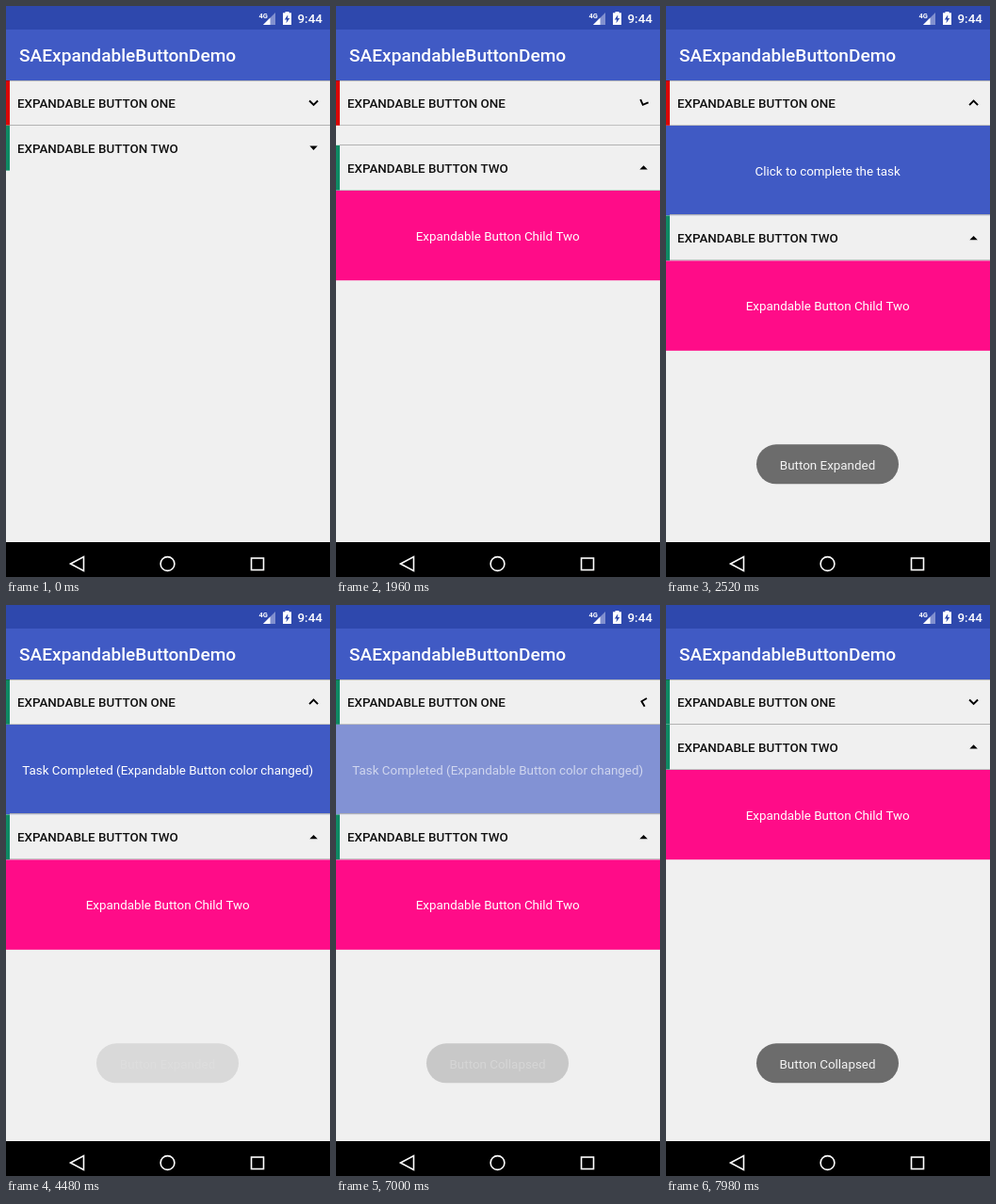
An HTML page with a canvas that plays this animation: 344 px wide and 606 px high, repeating every 8 s.

```html
<!DOCTYPE html>
<html lang="en">
<head>
<meta charset="utf-8">
<title>Expandable buttons</title>
<style>
  html, body { margin: 0; width: 100%; height: 100%; overflow: hidden; background: #f0f0f0; }
  canvas { display: block; width: 344px; height: 606px; }
</style>
</head>
<body>
<canvas id="stage"></canvas>
<script>
const W = 344, H = 606, LOOP = 8000, STEP = 70;
const ROW = 47.8, CHILD = 95.6, TOP = 79;
const BG = '#f0f0f0', BLUE = '#405ac4', PINK = '#ff0c88', RED = '#dc0505', GREEN = '#0f8a64';
const FONT = 'Roboto, "Open Sans", sans-serif';

// Moments of the user's taps, in ms
const OPEN_TWO = 400, OPEN_ONE = 1925, TASK_DONE = 4200, CLOSE_ONE = 6874;
const TOAST_DELAY = 44, TOAST_HOLD = 2056;

const canvas = document.getElementById('stage');
const ctx = canvas.getContext('2d');
const dpr = window.devicePixelRatio || 1;
canvas.width = W * dpr;
canvas.height = H * dpr;

const ramp = (t, start, length) => Math.min(1, Math.max(0, (t - start) / length));
const easeOut = p => 1 - (1 - p) * (1 - p);
const easeInOut = p => (1 - Math.cos(Math.PI * p)) / 2;

// Opening: make room, then fade in. Closing: fade out, then give the room back.
function panel(t, open, close) {
  return {
    room: easeOut(ramp(t, open, 300)) - easeOut(ramp(t, close + 300, 300)),
    alpha: easeInOut(ramp(t, open + 300, 300)) - easeInOut(ramp(t, close, 300)),
    turn: ramp(t, open, 300) - ramp(t, close, 300)
  };
}

function toastAlpha(t, tap) {
  const start = tap + TOAST_DELAY;
  const out = ramp(t, start + TOAST_HOLD, 500);
  return easeOut(ramp(t, start, 500)) * (1 - out * out);
}

function rect(x, y, w, h, color) {
  ctx.fillStyle = color;
  ctx.fillRect(x, y, w, h);
}

function text(str, x, y, size, color, weight = 400, align = 'left') {
  ctx.font = `${weight} ${size}px ${FONT}`;
  ctx.fillStyle = color;
  ctx.textAlign = align;
  ctx.fillText(str, x, y);
}

function path(points, closed) {
  ctx.beginPath();
  points.forEach(([x, y]) => ctx.lineTo(x, y));
  if (closed) ctx.closePath();
}

function fillPath(points, color) {
  path(points, true);
  ctx.fillStyle = color;
  ctx.fill();
}

function strokePath(points, color, width, closed) {
  path(points, closed);
  ctx.strokeStyle = color;
  ctx.lineWidth = width;
  ctx.stroke();
}

function statusBar() {
  rect(0, 0, W, 25, '#2e48ad');
  fillPath([[286, 7], [286, 20], [273, 20]], '#8190cf');
  fillPath([[280.5, 12.5], [280.5, 20], [273, 20]], '#fff');
  rect(268, 6, 11, 8, '#2e48ad');
  text('4G', 268.5, 13, 7.5, '#fff', 700);
  rect(296.5, 6, 4, 2, '#fff');
  rect(294, 7.3, 9, 12.7, '#fff');
  fillPath([[299.3, 9.3], [295.8, 14.5], [298, 14.5], [297.5, 18.2],
            [301.2, 13], [299, 13]], '#2e48ad');
  text('9:44', 309.5, 18, 13.4, '#fff', 500);
}

function appBar() {
  rect(0, 25, W, TOP - 25, BLUE);
  text('SAExpandableButtonDemo', 14, 59, 19.1, '#fff', 500);
}

function navBar() {
  rect(0, 569, W, H - 569, '#000');
  strokePath([[68.5, 592], [82.5, 584.5], [82.5, 599.5]], '#fff', 1.6, true);
  ctx.beginPath();
  ctx.arc(171.5, 592, 7.4, 0, Math.PI * 2);
  ctx.stroke();
  ctx.strokeRect(260.5, 586, 13, 12.5);
}

function arrow(y, turn, solid) {
  ctx.save();
  ctx.translate(326.6, y);
  ctx.rotate(turn * Math.PI);
  if (solid) fillPath([[-4.2, -2], [4.2, -2], [0, 2.3]], '#000');
  else strokePath([[-4.5, -2.3], [0, 2.2], [4.5, -2.3]], '#000', 1.9);
  ctx.restore();
}

function row(y, label, color, state, solid) {
  rect(0, y, W, ROW, BG);
  rect(4, Math.round(y) - 1, W - 4, 1, '#b2b2b2');
  if (state.room > 0) rect(4, Math.round(y + ROW) - 1, W - 4, 1, '#c0c0c0');
  rect(0, y, 4, ROW, color);
  text(label, 12, Math.round(y + 29), 13.4, '#111', 500);
  arrow(y + 23.8, state.turn, solid);
}

function child(y, label, color, alpha) {
  if (alpha <= 0) return;
  ctx.globalAlpha = alpha;
  rect(0, y, W, CHILD, color);
  text(label, 171.7, Math.round(y + 53), 13.4, '#fff', 400, 'center');
  ctx.globalAlpha = 1;
}

function toast(label, alpha) {
  if (alpha <= 0) return;
  ctx.save();
  ctx.globalAlpha = alpha;
  ctx.beginPath();
  ctx.roundRect(96, 465.3, 151, 42, 21);
  ctx.fillStyle = '#6c6c6c';
  ctx.fill();
  // Condensed face when present, else the regular one at its own size
  ctx.fontStretch = 'condensed';
  ctx.font = `400 15.3px ${FONT}`;
  const narrow = ctx.measureText(label).width < 108;
  if (!narrow) ctx.fontStretch = 'normal';
  text(label, 171.5, 492, narrow ? 15.3 : 13.4, '#f4f4f4', 400, 'center');
  ctx.restore();
}

function draw(t) {
  const one = panel(t, OPEN_ONE, CLOSE_ONE);
  const two = panel(t, OPEN_TWO, Infinity);
  const done = t >= TASK_DONE;
  const childOne = TOP + ROW;
  const rowTwo = childOne + CHILD * one.room;

  ctx.setTransform(dpr, 0, 0, dpr, 0, 0);
  rect(0, 0, W, H, BG);
  child(childOne, done ? 'Task Completed (Expandable Button color changed)'
                       : 'Click to complete the task', BLUE, one.alpha);
  child(rowTwo + ROW, 'Expandable Button Child Two', PINK, two.alpha);
  row(TOP, 'EXPANDABLE BUTTON ONE', done ? GREEN : RED, one, false);
  row(rowTwo, 'EXPANDABLE BUTTON TWO', GREEN, two, true);
  appBar();
  rect(0, TOP, W, 1, 'rgba(0, 0, 0, 0.22)');
  statusBar();
  navBar();
  toast('Button Expanded', toastAlpha(t, OPEN_ONE));
  toast('Button Collapsed', toastAlpha(t, CLOSE_ONE));
}

function tick() {
  const t = performance.now() % LOOP;
  draw(Math.floor(t / STEP) * STEP);
  requestAnimationFrame(tick);
}
tick();
</script>
</body>
</html>
```
